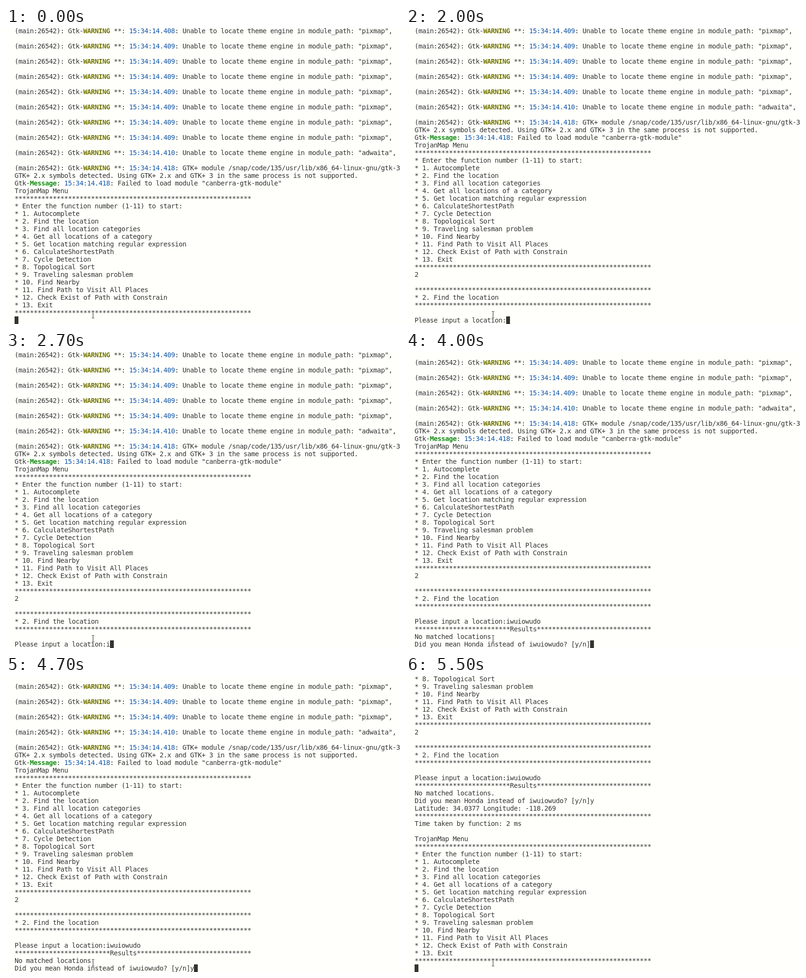
Write an HTML page with a canvas that moves like this. It is 826 by 622 pixels and loops after 8000 ms.

```html
<!DOCTYPE html>
<html lang="en">
<head>
<meta charset="utf-8">
<title>Terminal session</title>
<style>
html, body { margin: 0; width: 100%; height: 100%; overflow: hidden; background: #fffffc; }
canvas { display: block; }
</style>
</head>
<body>
<canvas id="screen" width="826" height="622"></canvas>
<script>
const LOOP = 8000;
const CELL = 8, LINE = 16, LEFT = 18, TOP = -2, ROWS = 39, BASELINE = 13;
const BG = '#fffffc', INK = '#333333';
const FONT = '14px "DejaVu Sans Mono", monospace';
const ctx = document.getElementById('screen').getContext('2d');

const STYLES = [
  { match: /^WARNING$/, color: '#737600', bold: true },
  { match: /^Message$/, color: '#158f15', bold: true },
  { match: /^\d\d:\d\d:\d\d/, color: '#0f54a8' }
];
const PLAIN = { color: INK };

const stars = n => '*'.repeat(n);
const RULE = stars(62);
const warning = (ms, text) => `(main:26542): Gtk-WARNING **: 15:34:14.${ms}: ${text}`;
const engine = (ms, name) =>
  [warning(ms, `Unable to locate theme engine in module_path: "${name}",`), ''];

const items = [
  'Autocomplete', 'Find the location', 'Find all location categories',
  'Get all locations of a category', 'Get location matching regular expression',
  'CalculateShortestPath', 'Cycle Detection', 'Topological Sort',
  'Traveling salesman problem', 'Find Nearby', 'Find Path to Visit All Places',
  'Check Exist of Path with Constrain', 'Exit'
];
const menu = [
  'TrojanMap Menu', RULE, '* Enter the function number (1-11) to start:',
  ...items.map((item, i) => `* ${i + 1}. ${item}`), RULE, ''
];
const startLog = [
  ...engine(408, 'pixmap'),
  ...Array.from({ length: 7 }, () => engine(409, 'pixmap')).flat(),
  ...engine(410, 'adwaita'),
  warning(418, 'GTK+ module /snap/code/135/usr/lib/x86_64-linux-gnu/gtk-3'),
  'GTK+ 2.x symbols detected. Using GTK+ 2.x and GTK+ 3 in the same process is not supported.',
  'Gtk-Message: 15:34:14.418: Failed to load module "canberra-gtk-module"',
  ...menu
];

// Each event appends text at the cursor; a newline starts a new row.
const query = 'iwuiowudo';
const events = [
  [1300, '2'],
  [2000, ['', '', RULE, '* 2. Find the location', RULE, '', 'Please input a location:'].join('\n')],
  [2700, query[0]],
  ...[0, 1, 2, 3].map(i => [2900 + i * 100, query.substr(1 + i * 2, 2)]),
  [4000, ['', stars(25) + 'Results' + stars(30), 'No matched locations.',
    `Did you mean Honda instead of ${query}? [y/n]`].join('\n')],
  [4700, 'y'],
  [5400, '\nLatitude: 34.0377 Longitude: -118.269\n'],
  [5500, [RULE, 'Time taken by function: 2 ms', '', ...menu].join('\n')]
];

function linesAt(t) {
  const typed = events.filter(([time]) => t >= time).map(([, text]) => text).join('');
  return (startLog.join('\n') + typed).split('\n').slice(-ROWS);
}

function drawLine(line, y) {
  let x = LEFT;
  for (const part of line.split(/(WARNING|Message|\d\d:\d\d:\d\d\.\d+)/)) {
    const style = STYLES.find(s => s.match.test(part)) || PLAIN;
    ctx.fillStyle = style.color;
    ctx.font = (style.bold ? 'bold ' : '') + FONT;
    for (const ch of part) {
      ctx.fillText(ch, x, y + BASELINE);
      x += CELL;
    }
  }
  return x;
}

function drawPointer() {
  ctx.fillStyle = BG;
  ctx.fillRect(181, 596, 3, 13);
  ctx.fillStyle = '#222222';
  ctx.fillRect(182, 596, 1, 13);
  for (const y of [595, 609]) {
    ctx.fillRect(180, y, 2, 1);
    ctx.fillRect(183, y, 2, 1);
  }
}

function draw(t) {
  ctx.fillStyle = BG;
  ctx.fillRect(0, 0, 826, 622);
  let end = LEFT;
  linesAt(t).forEach((line, row) => { end = drawLine(line, TOP + row * LINE); });
  ctx.fillStyle = INK;
  ctx.fillRect(end, TOP + (ROWS - 1) * LINE, CELL, LINE);
  drawPointer();
}

const start = performance.now();
function tick() {
  draw((performance.now() - start) % LOOP);
  requestAnimationFrame(tick);
}
tick();
</script>
</body>
</html>
```
